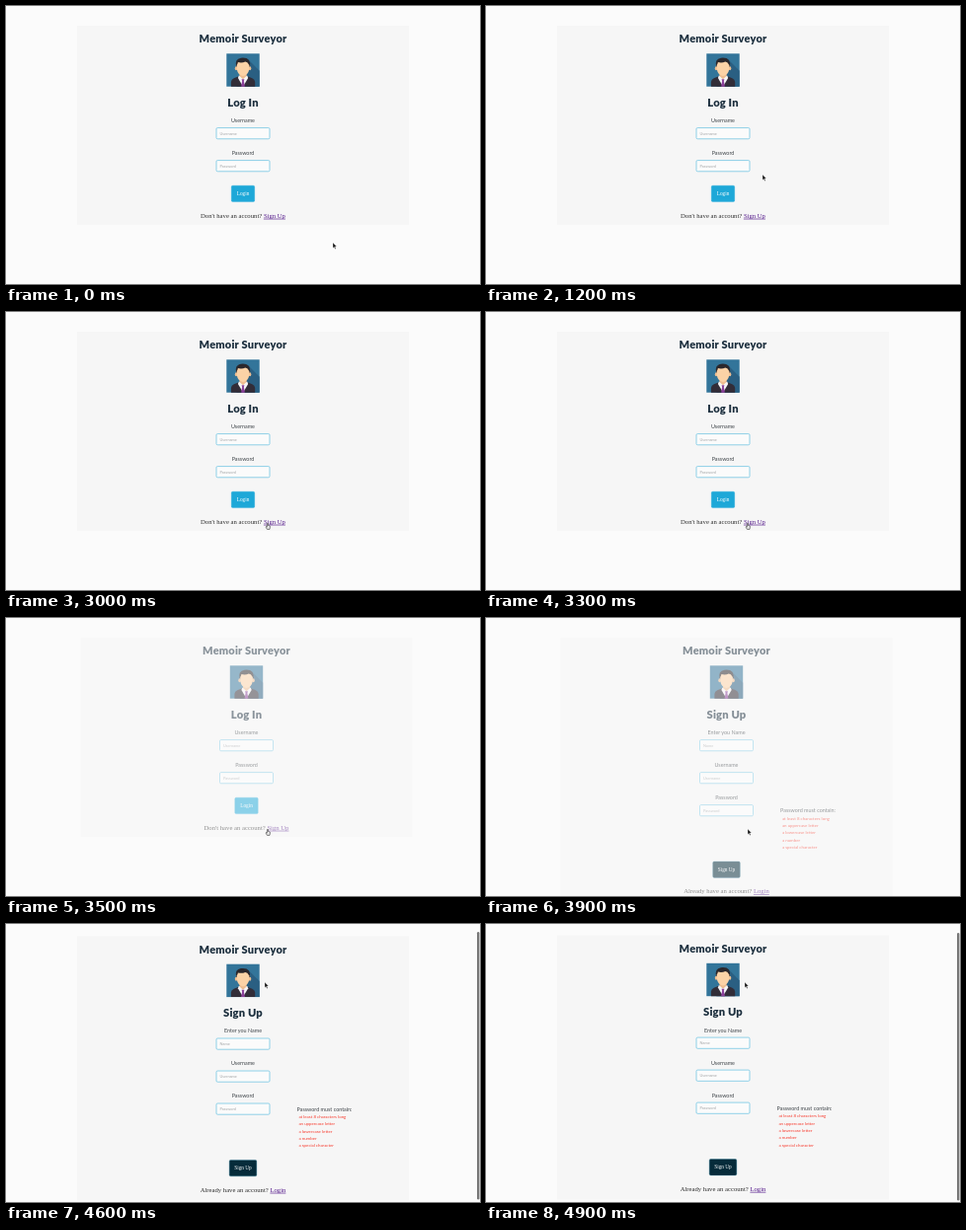
Write an HTML page that moves like this. It is 480 px wide and 282 px high and loops after 5000 ms.

```html
<!DOCTYPE html>
<html lang="en">
<head>
<meta charset="utf-8">
<title>Login and sign up</title>
<style>
html, body { margin: 0; width: 100%; height: 100%; overflow: hidden; background: #fbfbfb; }
svg { display: block; width: 480px; height: 282px; }
text { font-family: Lato, "Open Sans", sans-serif; fill: #40464b; text-anchor: middle; }
.title { font-size: 11px; font-weight: 900; letter-spacing: .2px; fill: #1b2e3d; }
.head { font-size: 11.2px; font-weight: 900; letter-spacing: .15px; fill: #1b2e3d; }
.label { font-size: 5.4px; }
.hint { font-size: 3.9px; fill: #a6a8aa; text-anchor: start; }
.rule { font-size: 4.4px; fill: #f8392c; text-anchor: start; }
.serif { font: 6.68px "Liberation Serif", serif; fill: #2c2c2c; }
.btn { font: 5.3px "Liberation Serif", serif; fill: #fff; }
.link { fill: #551a8b; text-decoration: underline; }
.field { fill: #fbfbfb; stroke: #6cc3e2; stroke-width: .75; }
</style>
</head>
<body>
<svg viewBox="0 0 480 282">
  <defs>
    <g id="avatar">
      <rect width="33.4" height="33.4" fill="#33759a"/>
      <path d="M22.5 6.5L33.4 17.4V33.4H10Z" fill="#2a5f82"/>
      <path d="M4.6 33.4V28.6Q4.8 26 7.5 25L13 22.8H20.5L26 25Q28.7 26 28.9 28.6V33.4Z" fill="#322d38"/>
      <path d="M12.4 22.4L11.6 24.6L16.7 33.4L21.9 24.6L21.1 22.4Z" fill="#f6f6f8"/>
      <path d="M13.2 18H20.3V22.8L16.7 26L13.2 22.8Z" fill="#eebd90"/>
      <path d="M15.3 26H18.1L17.6 28L18.6 33.4H14.8L15.8 28Z" fill="#8b419b"/>
      <path d="M9.8 13.6Q8 5.2 14.6 4.4Q25.2 3.2 23.7 13.6Z" fill="#2a272c"/>
      <ellipse cx="9.8" cy="15" rx="1.3" ry="2" fill="#eebd90"/>
      <ellipse cx="23.7" cy="15" rx="1.3" ry="2" fill="#eebd90"/>
      <path d="M10.4 11.6Q11.4 10.4 11.6 8.8Q16 9.6 19 8.2Q21.6 8.6 22 10.2Q22.4 11.2 23.1 11.6V15.4Q22 21.8 16.7 22.8Q11.4 21.8 10.4 15.4Z" fill="#fbd2a6"/>
    </g>
  </defs>
  <rect width="480" height="282" fill="#fbfbfb"/>
  <g id="login"></g>
  <g id="signup"></g>
  <rect id="bar" x="477" width="2.4" height="271.5" rx="1.2" fill="#777"/>
  <g id="pointer">
    <path id="arrow" d="M0 0V5.5L1.3 4.4L2.2 6.4L3.1 6L2.2 4.1H3.8Z" fill="#111" stroke="#fff" stroke-width=".35"/>
    <path id="hand" d="M-.6 .6Q0-.2 .5 .6V2.5L1.9 2.9Q2.6 3.1 2.4 4L2 6.4H-.6L-1.8 4.2Q-1.8 3.4-1.2 3.6L-.6 4.2Z" fill="#eee" stroke="#333" stroke-width=".6"/>
  </g>
</svg>
<script>
const $ = id => document.getElementById(id);
const LOOP = 5000, STEP = 100;

const text = (cls, x, y, s) => `<text class="${cls}" x="${x}" y="${y}">${s}</text>`;
const field = (y, label, hint) =>
  text('label', 240, y - 5.6, label) +
  `<rect class="field" x="213" y="${y}" width="54" height="11.2" rx="1.2"/>` +
  text('hint', 216.6, y + 7, hint);
const button = (y, w, label, fill, edge) =>
  `<rect x="${240 - w / 2}" y="${y}" width="${w}" height="16.4" rx="1.4" fill="${fill}" stroke="${edge}" stroke-width=".4"/>` +
  text('btn', 240, y + 9.8, label);
const footer = (y, s, link) =>
  text('serif', 240, y, `${s} <tspan class="link">${link}</tspan>`);
const page = (height, head, body) =>
  `<rect x="72" y="20" width="336" height="${height}" fill="#f6f6f6"/>` +
  text('title', 240, 37.4, 'Memoir Surveyor') + text('head', 240, 101.9, head) + body +
  '<use href="#avatar" x="223.3" y="48.3"/>';

$('login').innerHTML = page(202, 'Log In',
  field(123.6, 'Username', 'Username') +
  field(156.6, 'Password', 'Password') +
  button(182.2, 23.4, 'Login', '#1ea8d8', '#1ea8d8') +
  footer(214.7, "Don't have an account?", 'Sign Up'));

const rules = ['at least 8 characters long', 'an uppercase letter', 'a lowercase letter', 'a number', 'a special character'];
$('signup').innerHTML = page(268, 'Sign Up',
  field(123.6, 'Enter you Name', 'Name') +
  field(156.6, 'Username', 'Username') +
  field(189.6, 'Password', 'Password') +
  text('label', 322.5, 197.3, 'Password must contain:') +
  rules.map((r, i) => text('rule', 296.4, 204.7 + i * 7.35, r)).join('') +
  button(247, 27.6, 'Sign Up', '#062b3a', '#1c6f8c') +
  footer(279.3, 'Already have an account?', 'Login'));

// Each row: time, then values.
const path = [
  [500, 331, 240], [800, 312, 215], [1100, 280, 171], [1400, 280, 171],
  [1500, 302, 180], [1600, 250, 205], [1700, 184, 188], [1800, 148, 152],
  [2000, 240, 154], [2200, 240, 154], [2500, 255, 190], [2800, 265, 214],
  [3900, 265, 214], [4100, 264, 130], [4300, 262, 59]
];
const loginFade = [[3300, 1], [3700, 0]];
const signupFade = [[3700, 0], [3900, .52], [4100, .94], [4200, 1]];
const scroll = [[4400, 0], [4500, 5], [4600, 7.6], [4700, 8.1], [4800, 8.1], [4900, 8.5]];

function at(rows, t) {
  if (t <= rows[0][0]) return rows[0].slice(1);
  const i = rows.findIndex(r => r[0] > t);
  if (i < 0) return rows[rows.length - 1].slice(1);
  const a = rows[i - 1], b = rows[i], k = (t - a[0]) / (b[0] - a[0]);
  return a.slice(1).map((v, j) => v + (b[j + 1] - v) * k);
}

function show(id, opacity, dx, dy) {
  $(id).setAttribute('transform', `translate(${dx} ${-dy})`);
  $(id).setAttribute('opacity', opacity);
}

function draw(t) {
  const [x, y] = at(path, t), [top] = at(scroll, t);
  const dx = t >= 3400 && t < 4200 ? 3.5 : 0;
  const onLink = t >= 2800 && t < 3900;
  show('login', at(loginFade, t)[0], dx, 0);
  show('signup', at(signupFade, t)[0], dx, top);
  $('bar').setAttribute('opacity', t >= 4500 ? 1 : 0);
  $('bar').setAttribute('y', top + .4);
  $('pointer').setAttribute('transform', `translate(${x} ${y})`);
  $('arrow').setAttribute('opacity', onLink ? 0 : 1);
  $('hand').setAttribute('opacity', onLink ? 1 : 0);
}

const start = performance.now();
function tick(now) {
  const t = Math.max(0, now - start) % LOOP;
  draw(Math.floor(t / STEP) * STEP);
  requestAnimationFrame(tick);
}
draw(0);
requestAnimationFrame(tick);
</script>
</body>
</html>
```
